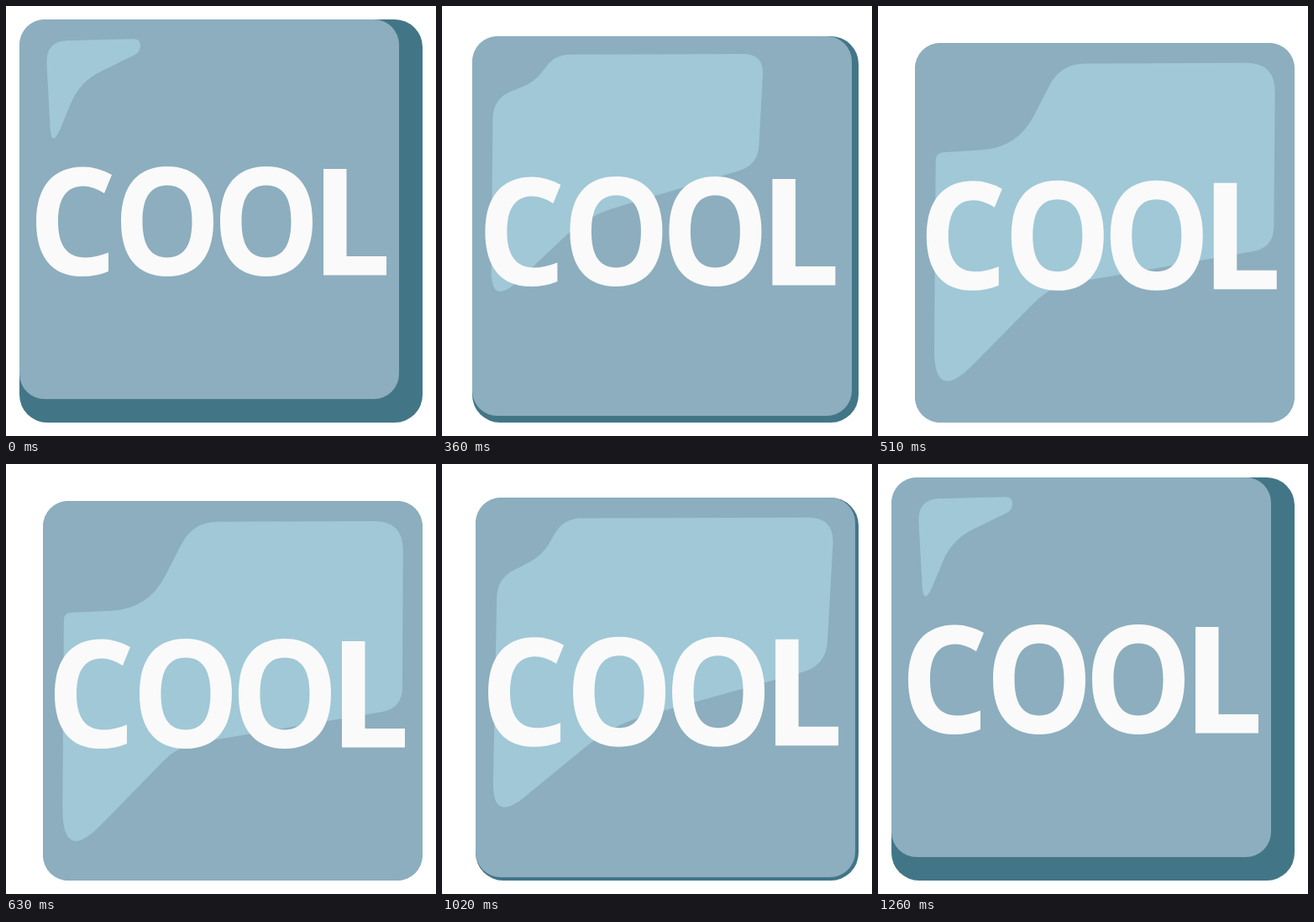
Recreate the animation shown at these times as an HTML page. Size 512x512 px, loop 1500 ms.

```html
<!DOCTYPE html>
<html lang="en">
<head>
<meta charset="utf-8">
<title>Cool button</title>
<style>
  html, body { margin: 0; width: 100%; height: 100%; overflow: hidden; background: #fff; }
  svg { display: block; width: 100%; height: 100%; }
</style>
</head>
<body>
<svg viewBox="0 0 512 512" role="img" aria-label="COOL">
  <rect id="side" rx="33" fill="#427687"/>
  <rect id="face" width="452" height="452" rx="30" fill="#8caebe"/>
  <path id="shine" fill="#a0c8d7"/>
  <g id="word" fill="#fafafa" fill-rule="evenodd">
    <path d="M126 201L117 223Q104 214.5 92 214.5C72 214.5 62 229 62 257S73 299.5 94 299.5Q107 299.5 122 293.5V316Q108 322 90 322C55 322 36 299 36 257C36 215 56 191.5 92 191.5Q109 191.5 126 201Z"/>
    <path id="o1"/>
    <path id="o2"/>
    <path d="M378 194H405.5V298H453V320.5H378Z"/>
  </g>
</svg>
<script>
const LOOP = 1500, STEP = 30;
const PUSH = 270, RELEASE = 990, REBOUND = 270;
const NEARLY = .875; // press at which the shine is at its widest bend

const el = id => document.getElementById(id);
const side = el('side'), face = el('face'), shine = el('shine'), word = el('word');
const mix = (a, b, k) => a + (b - a) * k;
const blend = (a, b, k) => a.map((v, i) => v.map((n, j) => mix(n, b[i][j], k)));

// Corners of the shine, clockwise from the lower tip: [x, y, rounding]
const rest = [[54, 172, 30], [47, 41, 28], [85, 41, 5], [110, 40, 5],
  [160, 39, 8], [160, 55, 8], [88, 90, 28]];
const wide = [[60, 432, 50], [66, 138, 22], [120, 110, 18], [145, 65, 22],
  [472, 64, 32], [462, 243, 30], [205, 314, 40]];
const down = [[67, 478, 68], [69, 178, 8], [170, 174, 45], [224, 69, 30],
  [473, 68, 35], [472, 292, 25], [205, 336, 25]];
const lifted = rest.map(([x, y, r]) => [33 + (x - 48) * .69, 42.3 + (y - 39) * .63, r * .66]);

function toward([x, y, r], [x2, y2]) {
  const k = r / Math.hypot(x2 - x, y2 - y);
  return [mix(x, x2, k), mix(y, y2, k)];
}

function rounded(corners) {
  const n = corners.length;
  return corners.map((c, i) => {
    const enter = toward(c, corners[(i + n - 1) % n]);
    const leave = toward(c, corners[(i + 1) % n]);
    return `${i ? 'L' : 'M'}${enter}Q${c[0]},${c[1]} ${leave}`;
  }).join('') + 'Z';
}

function oval(cx, cy, rx, ry, bulge) {
  const kx = rx * bulge, ky = ry * bulge;
  return `M${cx - rx} ${cy}C${cx - rx} ${cy - ky} ${cx - kx} ${cy - ry} ${cx} ${cy - ry}` +
    `S${cx + rx} ${cy - ky} ${cx + rx} ${cy}S${cx + kx} ${cy + ry} ${cx} ${cy + ry}` +
    `S${cx - rx} ${cy + ky} ${cx - rx} ${cy}Z`;
}

// 0 at rest, 1 fully down, -1 at the top of the rebound
function pressAt(t) {
  if (t <= PUSH || t >= RELEASE + REBOUND) return 0;
  if (t <= RELEASE) return 1 / (1 + (72 / (t - PUSH)) ** 3.8);
  return Math.cos(1.5 * Math.PI * (t - RELEASE) / REBOUND);
}

function shineAt(p) {
  if (p < 0) return blend(rest, lifted, -p);
  if (p < NEARLY) return blend(rest, wide, (p / NEARLY) ** 1.5);
  return blend(wide, down, (p - NEARLY) / (1 - NEARLY));
}

function setAll(node, attrs) {
  for (const name in attrs) node.setAttribute(name, attrs[name]);
}

function draw(time) {
  const p = pressAt(Math.floor((time % LOOP) / STEP) * STEP);
  const shift = (low, high) => p * (p < 0 ? high : low);
  const x = Math.round(16 + shift(28, 10)), y = Math.round(16 + shift(28, 5));
  setAll(face, { x, y });
  setAll(side, { x, y, width: 496 - x, height: 496 - y });
  setAll(shine, { d: rounded(shineAt(p)) });
  setAll(word, { transform: `translate(${shift(22, 10)} ${shift(17, 7.7)})` });
}

for (const [id, cx] of [['o1', 192], ['o2', 310]])
  setAll(el(id), { d: oval(cx, 256.5, 55, 65.5, .645) + oval(cx, 256.5, 29.5, 43, .667) });

const start = performance.now();
function tick() {
  draw(performance.now() - start);
  requestAnimationFrame(tick);
}
tick();
</script>
</body>
</html>
```
